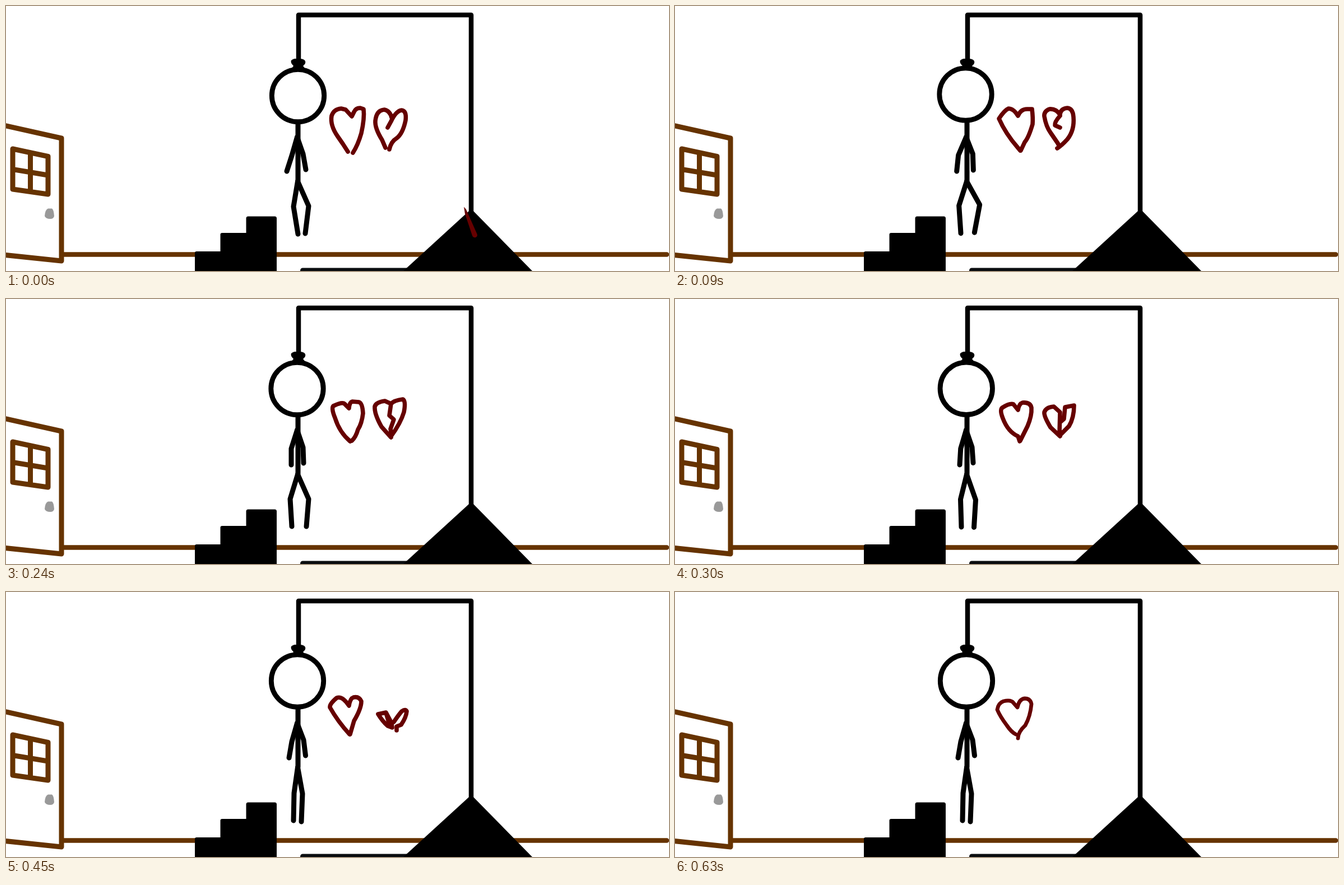
An HTML page with a canvas that plays this animation: 1183x473 px, repeating every 900 ms.

```html
<!DOCTYPE html>
<html lang="en">
<head>
<meta charset="utf-8">
<title>Stick figure and hearts</title>
<style>
html, body { margin: 0; width: 100%; height: 100%; overflow: hidden; background: #fff; }
canvas { display: block; }
</style>
</head>
<body>
<canvas id="stage" width="1183" height="473"></canvas>
<script>
const ctx = document.getElementById('stage').getContext('2d');
const LOOP = 900, STEP = 30, HEART_STEP = 90;
const BLACK = '#000', BROWN = '#663300', RED = '#660000';

// Joint positions at key times; poses between them are linear.
const poses = [
  { t: 0, head: [521, 160], armL: [510, 267, 501, 295], armR: [530, 264, 535, 292],
    legL: [513, 358, 521, 407], legR: [540, 357, 534, 406] },
  { t: 60, head: [519, 158], armL: [506, 267, 502, 295], armR: [531, 264, 533, 293],
    legL: [508, 357, 512, 406], legR: [543, 355, 534, 405] },
  { t: 150, head: [517.5, 156.5], armL: [505, 265, 504, 295], armR: [532, 264, 531, 293],
    legL: [504, 355, 506, 405], legR: [545, 354, 535, 403] },
  { t: 240, head: [519.5, 160], armL: [509, 267, 509, 296], armR: [530, 265, 531, 293],
    legL: [507, 357, 510, 406], legR: [540, 357, 536, 406] },
  { t: 360, head: [520, 159.5], armL: [510.5, 267, 507, 296], armR: [530, 264, 533, 292],
    legL: [512, 358, 512, 408], legR: [533, 360, 531, 409] },
  { t: 450, head: [520, 158.5], armL: [510, 267, 505, 296], armR: [531, 264, 534.5, 292],
    legL: [514, 359, 513, 408], legR: [529, 360, 527, 410] }
];

// One hand-drawn pair of hearts per HEART_STEP.
const hearts = [
  'M610 260 L601 246 L592 233 Q578 213 581 196 Q585 184 598 183 L606 185 L617 197 L621 189 ' +
  'Q624 182 632 182 L638 184 Q640 200 634 227 Q628 248 619 262 ' +
  'M677 253 L671 239 Q658 218 659 205 Q661 186 675 185 Q685 187 688 199 ' +
  'M681 217 L687 206 Q696 187 706 186 Q715 187 713 204 Q708 228 697 236 Q687 242 684 256',

  'M616 258 L611 252 Q590 228 578 201 Q588 186 595 183 Q604 183 612 196 Q617 184 628 184 ' +
  'L637 184 Q639 200 638 211 Q631 235 624 243 L617 258 ' +
  'M682 254 Q690 249 700 238 Q713 222 711 198 Q710 183 700 182 Q688 183 687 194 ' +
  'Q680 183 668 184 Q658 188 659 197 Q662 215 670 226 L683 245 L685 249 ' +
  'M687 196 Q677 207 678 213 L687 217',

  'M614 254 Q595 238 587 212 Q580 195 584 191 Q600 183 604 187 L612 195 Q613 184 618 183 ' +
  'L630 184 Q636 186 637 204 Q635 222 628 233 Q624 247 617 253 ' +
  'M687 247 L670 228 Q657 205 658 192 Q660 184 676 182 L687 187 Q692 181 708 179 ' +
  'Q714 182 710 202 Q704 222 687 245 M687 187 L684 208 L692 215 L686 232 L688 242',

  'M615 254 L612 245 Q594 237 585 213 Q579 198 584 194 Q598 185 604 188 L612 198 Q614 187 620 185 ' +
  'Q634 184 636 194 Q637 208 629 227 Q621 243 616 253 ' +
  'M687 245 L670 229 Q658 209 659 202 Q662 193 676 192 L687 202 L686 240 ' +
  'M687 220 L694 214 L696 193 L712 190 Q712 212 703 227 L687 243',

  'M615 253 L614 243 Q592 236 583 213 Q579 200 583 197 Q596 187 604 190 L613 201 Q615 190 622 186 ' +
  'Q634 185 635 192 Q637 206 630 222 Q620 238 615 253 ' +
  'M660 209 Q668 202 677 204 L686 219 L686 240 Q668 226 660 209 ' +
  'M686 224 L700 214 L702 205 L716 203 Q710 228 701 233 L687 241',

  'M613 254 Q592 231 578 206 Q577 200 590 189 Q600 185 612 203 Q614 190 620 188 ' +
  'Q630 186 634 195 Q634 208 621 230 L614 254 ' +
  'M664 218 L678 215 L688 234 L689 242 L681 239 Q672 231 664 218 M678 216 L684 236 ' +
  'M692 232 Q700 220 706 213 Q713 208 715 213 Q714 224 705 237 L697 240 L697 247',

  'M612 257 Q592 235 577 208 Q577 201 588 192 Q600 188 611 205 Q614 191 621 189 ' +
  'Q632 188 635 197 Q634 212 622 234 L613 257 ' +
  'M668 228 L679 226 L688 239 L688 245 Q676 241 668 228 ' +
  'M693 239 Q704 226 712 223 Q717 224 710 234 Q704 242 696 245',

  'M608 254 Q600 250 592 238 Q580 222 575 210 Q577 198 586 195 Q600 192 604 198 L611 206 ' +
  'Q614 191 624 190 Q634 190 636 200 Q634 222 625 238 Q612 250 612 261'
].map(d => new Path2D(d));

function stroke(d, color, width) {
  ctx.strokeStyle = color;
  ctx.lineWidth = width;
  ctx.stroke(d instanceof Path2D ? d : new Path2D(d));
}

function fill(d, color) {
  ctx.fillStyle = color;
  ctx.fill(new Path2D(d));
}

function poseAt(t) {
  const next = poses.findIndex(p => p.t > t);
  if (next < 0) return poses[poses.length - 1];
  const a = poses[next - 1], b = poses[next];
  const k = (t - a.t) / (b.t - a.t);
  const mix = part => a[part].map((v, i) => v + (b[part][i] - v) * k);
  const pose = {};
  for (const part of ['head', 'armL', 'armR', 'legL', 'legR']) pose[part] = mix(part);
  return pose;
}

function drawRoom() {
  stroke('M102 443.5H1179', BROWN, 8.5);
  stroke('M-6 212.5L99 236V455L-6 444', BROWN, 9);
  stroke('M12 255L75 268.5V336L12 327ZM43.5 262V331M12 291.5L75 302', BROWN, 9);
  fill('M75 361.5H82Q85 363 86 375Q85 380 79 380Q71 380 69 375Q70 363 75 361.5Z', '#999');
  fill('M337 473V441Q337 438 340 438H382.5V408Q382.5 405 385.5 405H428.5V379' +
    'Q428.5 375.5 432 375.5H479.5Q483 375.5 483 379V473Z', BLACK);
  stroke('M529.5 472H722', '#090c0f', 9);
  fill('M826 366Q830 362 834 366L939 473H709Z', BLACK);
  stroke('M522 100V16H830V370', BLACK, 8.5);
  fill('M512 95Q517 93 521 95.5Q527 93 532 96Q536 99 533 104L530 107L534 112H509' +
    'L513 107Q507 101 509 97Z', BLACK);
}

function drawFigure(pose) {
  const limb = (x, y, [jx, jy, ex, ey]) => stroke(`M${x} ${y}L${jx} ${jy}L${ex} ${ey}`, BLACK, 9);
  stroke('M521 205V312', BLACK, 9);
  limb(519.5, 234, pose.armL);
  limb(519.5, 234, pose.armR);
  limb(520.5, 313, pose.legL);
  limb(520.5, 313, pose.legR);
  ctx.beginPath();
  ctx.arc(pose.head[0], pose.head[1], 46.7, 0, Math.PI * 2);
  ctx.fillStyle = '#fff';
  ctx.fill();
  ctx.strokeStyle = BLACK;
  ctx.lineWidth = 8.8;
  ctx.stroke();
}

function draw(t) {
  ctx.fillStyle = '#fff';
  ctx.fillRect(0, 0, 1183, 473);
  ctx.lineCap = ctx.lineJoin = 'round';
  drawRoom();
  drawFigure(poseAt(Math.floor(t / STEP) * STEP));
  const i = Math.min(Math.floor(t / HEART_STEP), hearts.length - 1);
  stroke(hearts[i], RED, i === hearts.length - 1 ? 6.8 : 7.6);
  if (i === 0) fill('M817 358.5L821 363L840.5 407Q842 411 838 413Q834 414 832 410L819 371Z', RED);
}

const start = performance.now();
function tick() {
  draw((performance.now() - start) % LOOP);
  requestAnimationFrame(tick);
}
tick();
</script>
</body>
</html>
```
